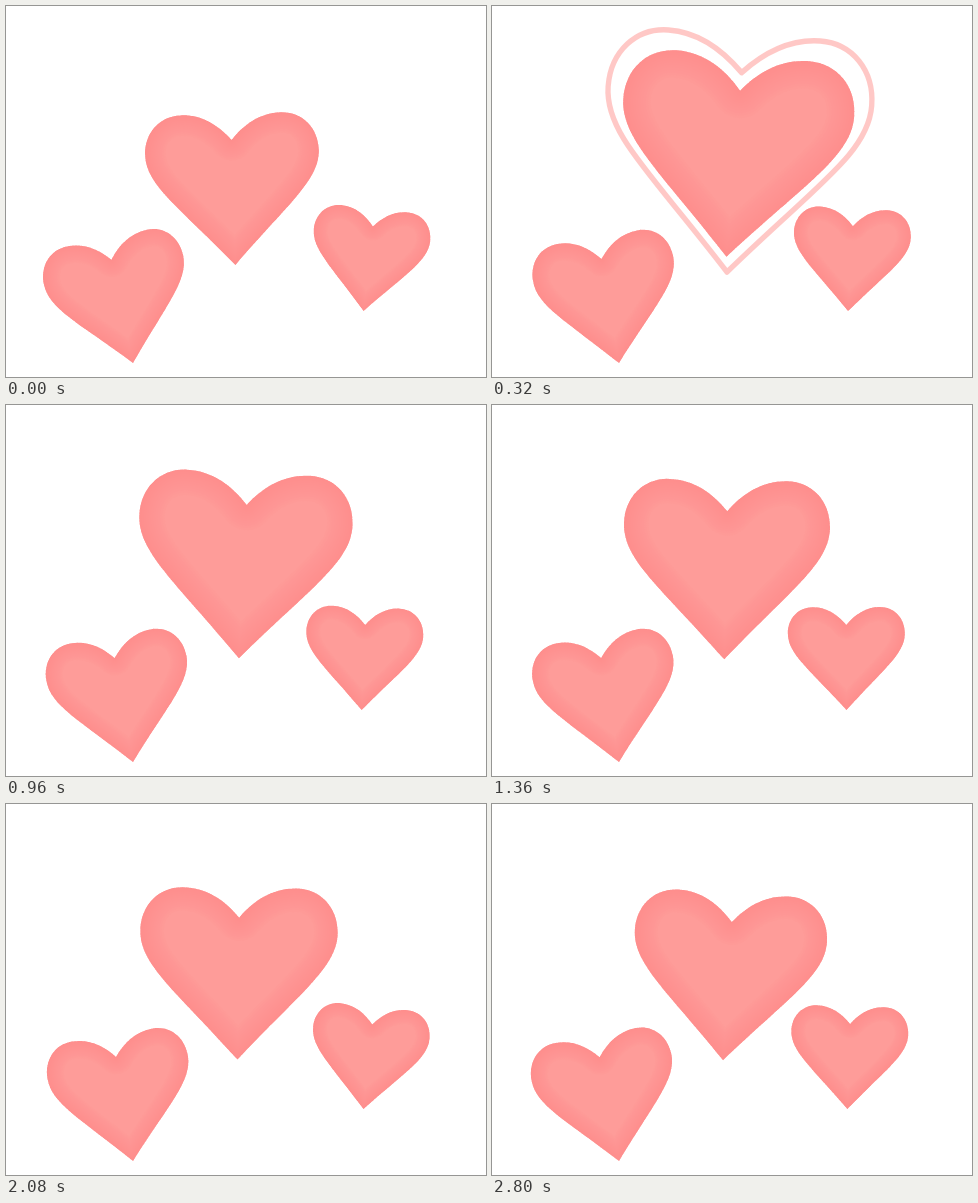
These frames come from a looping animation (480x371 px, 2.88 s). An HTML page with a canvas:

```html
<!DOCTYPE html>
<html>
<head>
<meta charset="utf-8">
<style>
  html, body { margin: 0; overflow: hidden; background: #fff; }
  canvas { display: block; }
</style>
</head>
<body>
<canvas id="stage" width="480" height="371"></canvas>
<script>
const ctx = document.getElementById('stage').getContext('2d');
const LOOP = 2880, STEP = 80, POP = 320;

// Heart standing on its tip, with the notch about 100 units above it
const heartPath = notch => new Path2D(`M0 ${-notch}
  C10 -112 23 -121 40 -121 C57 -121 69.5 -108 69.5 -90 C69.5 -66 44 -48 0 0
  C-44 -48 -69.5 -66 -69.5 -90 C-69.5 -108 -57 -121 -40 -121 C-23 -121 -10 -112 0 ${-notch}Z`);
const body = heartPath(100), outline = heartPath(102);

const wave = (t, peak, period) => Math.cos(2 * Math.PI * (t - peak) / period);

function place(x, y, size, degrees, widen, draw) {
  ctx.save();
  ctx.translate(x, y);
  ctx.rotate(degrees * Math.PI / 180);
  ctx.scale(size / 100 * widen, size / 100);
  ctx.lineJoin = 'round';
  draw();
  ctx.restore();
}

function heart(x, y, size, degrees, widen = 1) {
  place(x, y, size, degrees, widen, () => {
    ctx.fillStyle = '#fe9c99';
    ctx.fill(body);
    ctx.clip(body);
    ctx.strokeStyle = 'rgba(238, 110, 110, 0.042)';
    for (let w = 3; w <= 33; w += 3) {
      ctx.lineWidth = w;
      ctx.stroke(body);
    }
  });
}

// Outline that spreads and fades around the peak of the beat
function ring(t) {
  const age = t - POP;
  if (Math.abs(age) > STEP) return;
  const size = 196 + age * 0.1;
  place(235, 266 + age * 0.03, size, 4.2, 0.97, () => {
    ctx.lineWidth = 550 / size;
    ctx.strokeStyle = `rgba(255, 155, 152, ${0.55 - age / 320})`;
    ctx.stroke(outline);
  });
}

// Quick swell, then a slow decay
function bigHeart(t) {
  const pop = Math.sin(Math.PI / 2 * Math.min(1, t / POP));
  const grown = t < POP ? 41.6 * pop : 9 + 32.6 * Math.exp((POP - t) / 1250);
  const drift = 2.5 + 2.2 * wave(t, 300, 3000);
  const tilt = -1.8 + (drift + 1.8) * pop;
  heart(229.5 + grown * 0.12, 259 - grown * 0.2, 125 + grown, tilt);
}

function leftHeart(t) {
  heart(127, 357, 105.5, -10.6 + 1.4 * wave(t, 250, 600), 0.97);
}

function rightHeart(t) {
  const sway = 2.2 + 2.3 * wave(t, 60, 960) + 2 * wave(t, 60, 1920);
  heart(354.5 + sway * 0.5, 305, 85, sway, 0.99);
}

function render(now) {
  const t = Math.floor(now % LOOP / STEP) * STEP;
  ctx.clearRect(0, 0, 480, 371);
  for (const draw of [ring, bigHeart, leftHeart, rightHeart]) draw(t);
}

const start = performance.now();
function loop() {
  render(performance.now() - start);
  requestAnimationFrame(loop);
}
loop();
</script>
</body>
</html>
```
